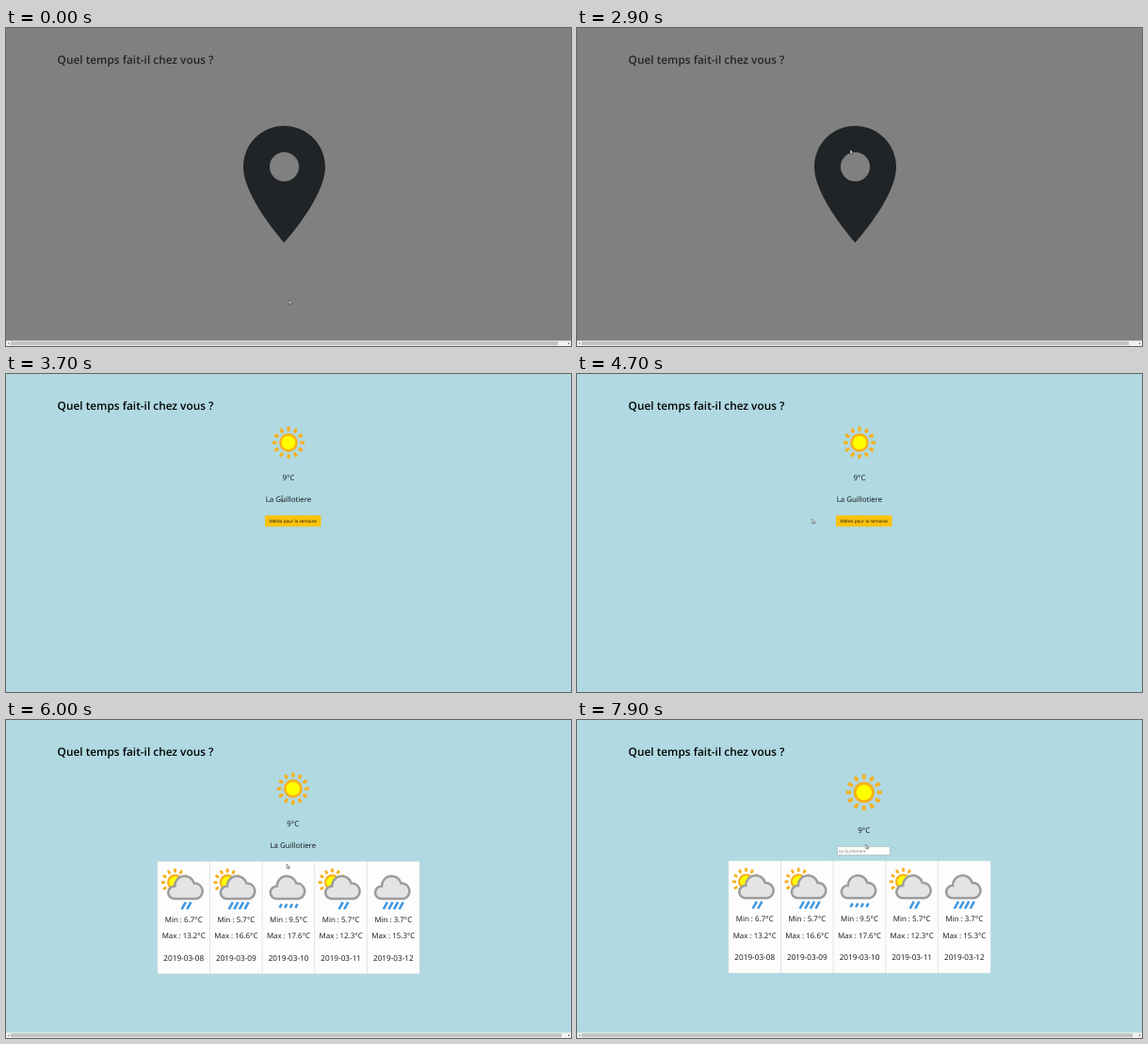
Animation, 600 px wide and 338 px high, one loop 8 s. Source, as an HTML page:

```html
<!DOCTYPE html>
<html lang="fr">
<head>
<meta charset="utf-8">
<title>Météo</title>
<style>
  html, body { margin: 0; width: 100%; height: 100%; overflow: hidden; background: #818080; }
  svg { display: block; width: 100%; height: 100%; font-family: "Open Sans", "Noto Sans", sans-serif; }
  text { fill: #111416; text-rendering: geometricPrecision; }
  .mid { text-anchor: middle; }
  .t8 { font-size: 7.9px; }
  .small { font-size: 4.7px; }
  .step { animation: 8s step-end infinite; }
  .scene { visibility: hidden; }

  #sky { animation-name: sky; }
  #title { font-size: 11.85px; font-weight: 600; animation-name: title; }
  #locate { animation-name: locate; }
  #loading { animation-name: loading; }
  #today { animation-name: today; }
  #week { animation-name: week; }
  #view { animation-name: view; }
  #edit { animation-name: edit; }
  #cards { animation-name: cards; }
  #hover { animation-name: hover; }
  #beam { animation-name: beam; }
  #arrow { animation-name: arrow; }
  #spin { transform-origin: 300px 48px; animation: spin 8s linear infinite; }
  #cursor { animation: move 8s linear infinite; }

  @keyframes sky { 0% { fill: #818080; } 46.25%, 100% { fill: #b0d9e1; } }
  @keyframes title { 0% { fill: #212529; } 46.25%, 100% { fill: #000; } }
  @keyframes locate { 0% { visibility: visible; } 40%, 100% { visibility: hidden; } }
  @keyframes loading { 0% { visibility: hidden; } 40% { visibility: visible; } 46.25%, 100% { visibility: hidden; } }
  @keyframes today { 0% { visibility: hidden; } 46.25% { visibility: visible; } 73.75%, 100% { visibility: hidden; } }
  @keyframes week { 0% { visibility: hidden; } 73.75%, 100% { visibility: visible; } }
  @keyframes view { 0% { visibility: hidden; } 73.75% { visibility: visible; } 96.25%, 100% { visibility: hidden; } }
  @keyframes edit { 0% { visibility: hidden; } 96.25%, 100% { visibility: visible; } }
  @keyframes cards { 0% { transform: none; } 96.25%, 100% { transform: translateY(-.7px); } }
  @keyframes hover { 0% { visibility: hidden; } 67.5% { visibility: visible; } 73.75%, 100% { visibility: hidden; } }
  @keyframes beam { 0% { visibility: hidden; } 46.25% { visibility: visible; } 51.25%, 100% { visibility: hidden; } }
  @keyframes arrow { 0% { visibility: visible; } 46.25% { visibility: hidden; } 51.25%, 100% { visibility: visible; } }
  @keyframes spin { from { transform: rotate(72deg); } to { transform: rotate(3912deg); } }
  @keyframes move {
    0%, 3.75% { transform: translate(300.5px, 289px); }
    13.75%, 15% { transform: translate(305.5px, 221.5px); }
    17.5% { transform: translate(372px, 284px); }
    18.75% { transform: translate(428px, 290px); }
    21.25%, 22.4% { transform: translate(421.5px, 257.5px); }
    25%, 26.25% { transform: translate(418px, 248px); }
    36.25%, 46.25% { transform: translate(290px, 129px); }
    51.25% { transform: translate(292px, 132px); }
    58.75%, 59.9% { transform: translate(249.5px, 154px); }
    61.25%, 62.5% { transform: translate(258px, 172px); }
    65% { transform: translate(288px, 177px); }
    70%, 81.25% { transform: translate(298px, 153px); }
    86.25% { transform: translate(324px, 145px); }
    91.25%, 100% { transform: translate(306.5px, 132px); }
  }
</style>
</head>
<body>
<svg viewBox="0 0 600 338" preserveAspectRatio="none">
  <defs>
    <g id="rays" stroke="#f8b01c" stroke-width="3.2"></g>
    <g id="sun">
      <use href="#rays"/>
      <circle r="8.6" fill="#ff0" stroke="#f8b01c" stroke-width="2.6"/>
    </g>
    <path id="cloud" d="M-13 190A6.6 6.6 0 0 1-12.3 176.8A10.5 10.5 0 0 1 8.3 173.6A8.35 8.35 0 0 1 11 190Z"
      fill="#e4e4e5" stroke="#9c9c9e" stroke-width="2.5"/>
    <g id="bar">
      <rect y="332.3" width="600" height="5.7" fill="#f1f1f1"/>
      <path d="M3.3 334L1.8 335.2L3.3 336.4ZM597 334L598.5 335.2L597 336.4Z" fill="#666"/>
    </g>
    <g id="button">
      <rect width="59.5" height="12" rx="1.3" fill="#fcc20b"/>
      <text class="mid small" x="29.7" y="7.7">Météo pour la semaine</text>
    </g>
  </defs>

  <rect id="sky" class="step" width="600" height="338"/>
  <text id="title" class="step" x="54.6" y="37.5">Quel temps fait-il chez vous ?</text>

  <g id="locate" class="scene step">
    <path transform="translate(220.93 91.6) scale(6.214)" fill="#202427" fill-rule="evenodd"
      d="M12 2C8.13 2 5 5.13 5 9c0 5.25 7 13 7 13s7-7.75 7-13c0-3.87-3.13-7-7-7zm0 9.5a2.5 2.5 0 0 1 0-5a2.5 2.5 0 0 1 0 5z"/>
    <use href="#bar"/>
    <rect x="5" y="333.2" width="581" height="4" fill="#c1c1c1"/>
  </g>

  <g id="loading" class="scene step">
    <path id="spin" d="M296.75 51.25A4.6 4.6 0 1 1 303.25 51.25" fill="none" stroke="#2a2d30" stroke-width="1.3"/>
    <use href="#button" x="275" y="52.7"/>
  </g>

  <g id="today" class="scene step">
    <use href="#sun" x="300" y="73"/>
    <text class="mid t8" x="300" y="112.6">9°C</text>
    <text class="mid t8" x="300" y="136">La Guillotiere</text>
    <use href="#button" x="275" y="150.3"/>
  </g>
  <g id="hover" class="scene step">
    <rect x="274.4" y="149.7" width="60.7" height="13.2" rx="1.8" fill="#e0a800"/>
    <text class="mid small" x="304.7" y="158">Météo pour la semaine</text>
  </g>

  <g id="week" class="scene step">
    <g id="cards" class="step"></g>
    <use href="#bar"/>
    <rect x="5" y="333.2" width="585" height="4" fill="#c1c1c1"/>
  </g>

  <g id="view" class="scene step">
    <use href="#sun" x="304.8" y="73"/>
    <text class="mid t8" x="304.8" y="112.6">9°C</text>
    <text class="mid t8" x="304.8" y="136">La Guillotiere</text>
  </g>
  <g id="edit" class="scene step">
    <use href="#sun" transform="translate(304.8 77) scale(1.13)"/>
    <text class="mid t8" x="304.8" y="120.2">9°C</text>
    <rect x="276.7" y="134.8" width="55.4" height="8.5" fill="#fff" stroke="#b4b8ba" stroke-width=".6"/>
    <text class="small" x="277.7" y="140.8" style="fill:#777">La Guillotiere</text>
  </g>

  <g id="cursor">
    <path id="arrow" class="step" d="M.2 .2V4.8L1.3 3.8L2 5.4L2.8 5L2.1 3.5H3.5Z" fill="#fff" stroke="#111" stroke-width=".45"/>
    <path id="beam" class="scene step" d="M2.2 .6H4.2M3.2 .6V6M2.2 6H4.2" fill="none" stroke="#222" stroke-width=".5"/>
  </g>
</svg>
<script>
  const NS = "http://www.w3.org/2000/svg";
  const add = (parent, tag, attrs, text) => {
    const el = document.createElementNS(NS, tag);
    for (const key in attrs) el.setAttribute(key, attrs[key]);
    if (text) el.textContent = text;
    return parent.appendChild(el);
  };

  const rays = document.getElementById("rays");
  for (let a = 0; a < 360; a += 30)
    add(rays, "path", { d: "M12.3 0H17", transform: `rotate(${a})` });

  const days = [
    { min: "6.7", max: "13.2", sun: true, drops: 2 },
    { min: "5.7", max: "16.6", sun: true, drops: 4 },
    { min: "9.5", max: "17.6", drops: 4, light: true },
    { min: "5.7", max: "12.3", sun: true, drops: 2 },
    { min: "3.7", max: "15.3", drops: 4 }
  ];
  const cards = document.getElementById("cards");
  const width = 55.65;

  days.forEach((day, i) => {
    const left = 160.9 + i * width, mid = left + width / 2;
    const label = (y, text, size = 7.95) =>
      add(cards, "text", { class: "mid", x: mid, y, "font-size": size }, text);

    add(cards, "rect", { x: left, y: 150.3, width, height: 119.5, rx: 1,
      fill: "#fdfdfd", stroke: "#d9dddf", "stroke-width": .5 });

    const cx = mid + (day.sun ? 2.8 : 0);
    if (day.sun) add(cards, "use", { href: "#sun", transform: `translate(${mid - 9.2} 172.6) scale(.86)` });
    add(cards, "use", { href: "#cloud", x: cx });

    const [top, fall, slant] = day.light ? [195.6, 4, 2.2] : [193.6, 7.6, 4.2];
    for (let n = 0; n < day.drops; n++) {
      const x = cx + (n - (day.drops - 1) / 2) * 5.6;
      add(cards, "path", { d: `M${x + slant / 2} ${top}l${-slant} ${fall}`,
        stroke: "#3c95e0", "stroke-width": 2.5 });
    }

    label(215, `Min : ${day.min}°C`);
    label(232.4, `Max : ${day.max}°C`);
    label(256, `2019-03-${String(8 + i).padStart(2, "0")}`, 8.2);
  });
</script>
</body>
</html>
```
